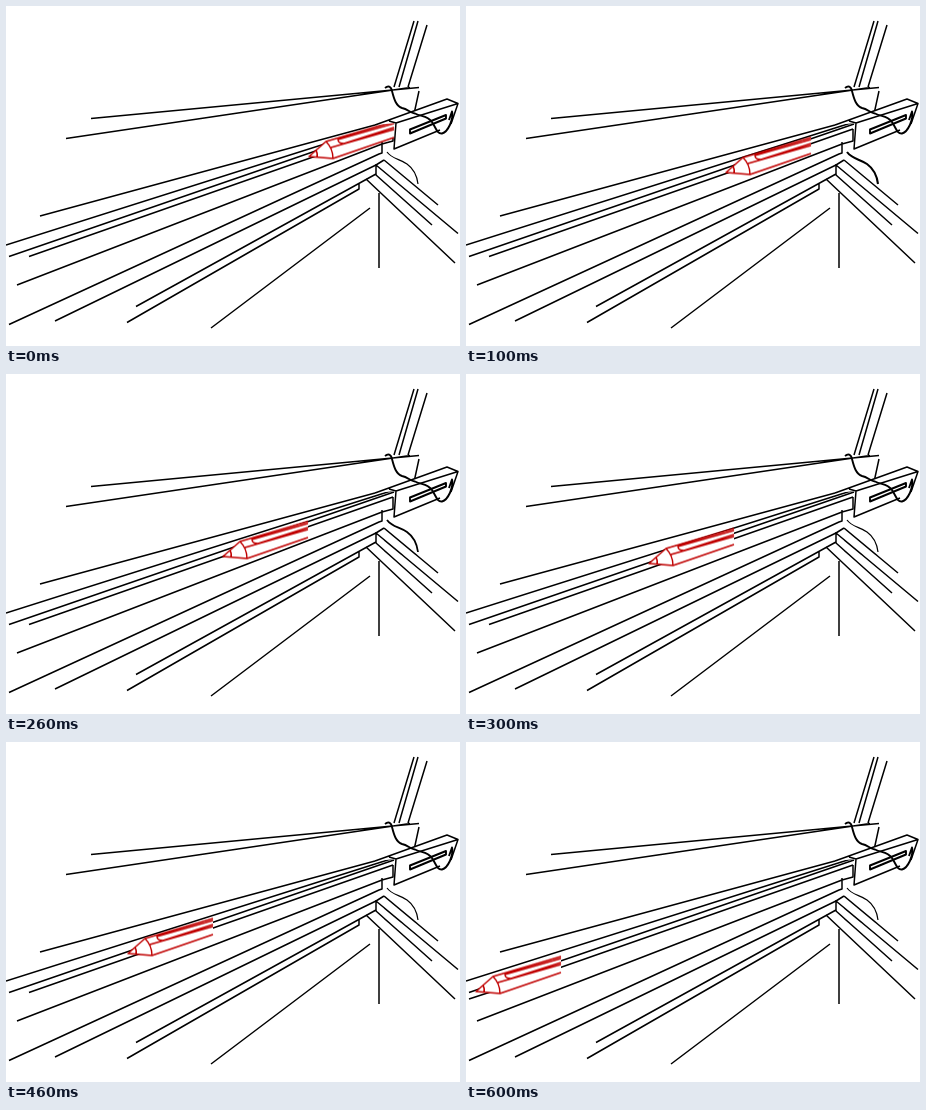
These frames come from a looping animation (454x340 px, 700 ms). An HTML page:

```html
<!DOCTYPE html>
<html lang="en">
<head>
<meta charset="utf-8">
<title>Pencil on a rail</title>
<style>
  html, body { margin: 0; width: 100%; height: 100%; overflow: hidden; background: #fff; }
  svg { display: block; width: 100%; height: 100%; }
  path { fill: none; stroke: #000; stroke-width: 1.5; stroke-linejoin: round; }
  .bold { stroke-width: 1.9; }
  .pencil path { stroke: #c00000; stroke-width: 1.4; }
  .pencil .body, .mask { fill: #fff; stroke: none; }

  .pencil, .rail-end, .cord { animation: 700ms step-end infinite; }
  .pencil { animation-name: slide; }
  .rail-end { animation-name: reveal; }
  .cord { animation-name: thicken; }

  /* seven held poses */
  @keyframes slide {
    0% { transform: translate(303px, 150.5px); }
    14.2857% { transform: translate(260px, 166.5px); }
    28.5714% { transform: translate(217px, 182.5px); }
    42.8571% { transform: translate(183px, 189.5px); }
    57.1428% { transform: translate(122px, 211.5px); }
    71.4285% { transform: translate(85px, 224px); }
    85.7142%, 100% { transform: translate(10px, 249.5px); }
  }
  @keyframes reveal {
    0% { opacity: 0; }
    85.7142%, 100% { opacity: 1; }
  }
  @keyframes thicken {
    0% { stroke-width: 1.2; }
    14.2857% { stroke-width: 2.1; }
    28.5714% { stroke-width: 1.8; }
    42.8571%, 100% { stroke-width: 1.2; }
  }
</style>
</head>
<body>
<svg viewBox="0 0 454 340">
  <!-- wall and post -->
  <path d="M85 112.500L413 81.500M60 132.500L404 81.500M408 15L388 81M412 15L393 81M421 19L402 81M413 85L408 108"/>

  <!-- rails -->
  <path d="M34 210L369 119M0 239L388 116M3 250.500L388 118M23 250.500L387 123"/>
  <path class="rail-end" d="M3 257L23 250.500"/>
  <path d="M11 279L376 138L387 135V123M376 136V147L373 148L3 318.500M49 315L370 159L378 154M130 300.500L370 168M121 316.500L353 183V177M205 322L364 202"/>

  <!-- lower frame -->
  <path d="M378 154L432 199M370 159L452 227.500M370 158V169L426 219M360 173L449 257M373 187V262"/>
  <path class="cord" d="M381 146C386 153 394 153 401 158C408 163 411 170 412 178"/>

  <g class="pencil">
    <path class="body" d="M0 0L17 -15L85 -35V-19L24 2Z"/>
    <path d="M85 -35L17 -15L0 0L24 2L85 -19M17 -15Q24 -8 24 2M7 -6Q9 -3 8 1M22 -9L85 -27M85 -33L29 -17Q29 -13 35 -13L85 -29"/>
  </g>

  <!-- box with slot and cable -->
  <path class="mask" d="M369 119L441 93L452 97.500L445 118L388 143L390 117Z"/>
  <path d="M369 119L441 93L452 97.500L390 117L388 143L434 124M452 97.500L445 118M383 115L390 117"/>
  <path class="bold" d="M404 123.500L440 109V112.500L404 127.500Z"/>
  <path class="bold" d="M379 82C382 79.500 385 80 386 85C388 93 390 100 396 102C402 103 404 107 409 107.500C416 111 421 109 426 116C430 122 431 128 436 127.500C442 126 448 113 446 105.500L443 114"/>
</svg>
</body>
</html>
```
